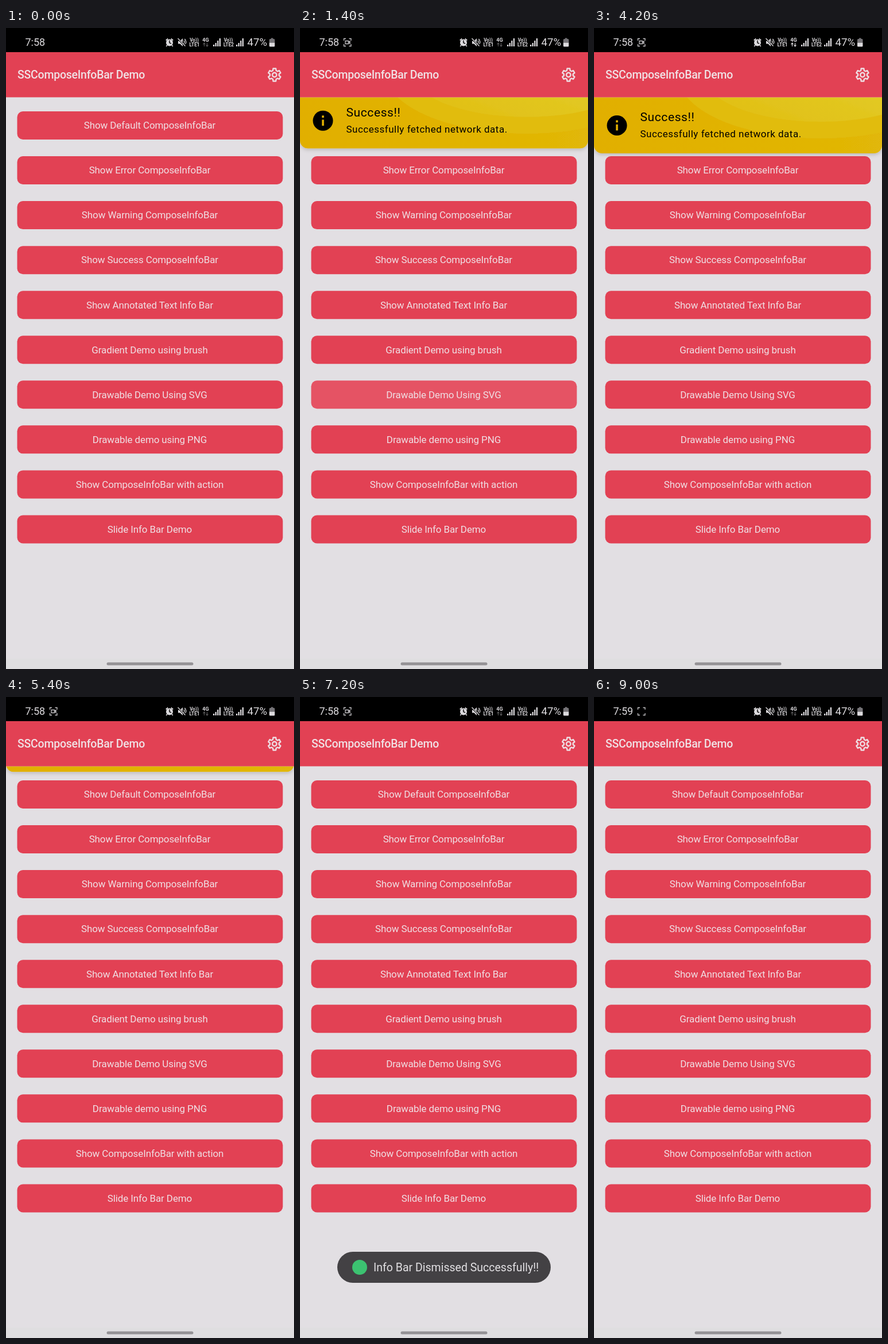
Animation, 502 px wide and 1115 px high, one loop 9.1 s. Source, as an HTML page:

```html
<!DOCTYPE html>
<html lang="en">
<head>
<meta charset="utf-8">
<title>SSComposeInfoBar Demo</title>
<style>
  html, body { margin: 0; width: 100%; height: 100%; overflow: hidden; background: #e2dfe3; }
  svg { display: block; width: 100vw; height: 100vh; font-family: Roboto, "Noto Sans", sans-serif; }
  .label { font-size: 17px; letter-spacing: -.12px; text-anchor: middle; fill: #efdfe4; }
  .tiny { font-size: 8.2px; font-weight: 700; text-anchor: middle; }
</style>
</head>
<body>
<svg viewBox="0 0 502 1115">
  <defs>
    <linearGradient id="gold" x2="1" y2="0">
      <stop stop-color="#e1af00"/><stop offset="1" stop-color="#e1b707"/>
    </linearGradient>
    <linearGradient id="lemon" x1="0" y1="1" x2=".6" y2=".4">
      <stop stop-color="#e1bd12"/><stop offset="1" stop-color="#e2cb26"/>
    </linearGradient>
    <filter id="shade" x="-5%" y="-10%" width="110%" height="130%">
      <feDropShadow dx="0" dy="2" stdDeviation="3.5" flood-color="#000" flood-opacity=".2"/>
    </filter>
    <clipPath id="below"><rect y="120.5" width="502" height="995"/></clipPath>
    <clipPath id="barShape"><path d="M0 100H502V204a14 14 0 0 1-14 14H14a14 14 0 0 1-14-14Z"/></clipPath>
    <clipPath id="pressed"><rect x="19.5" y="613" width="463" height="49" rx="10"/></clipPath>
  </defs>

  <rect width="502" height="1115" fill="#e2dfe3"/>
  <g id="buttons"></g>
  <circle id="ripple" cx="251" cy="637.5" fill="#fff" clip-path="url(#pressed)"/>

  <g clip-path="url(#below)">
    <g id="bar">
      <g filter="url(#shade)">
        <g clip-path="url(#barShape)">
          <rect y="100" width="502" height="118" fill="url(#gold)"/>
          <ellipse cx="395" cy="80" rx="250" ry="112" fill="#e1bc10"/>
          <ellipse cx="395" cy="80" rx="205" ry="83" fill="url(#lemon)"/>
        </g>
      </g>
      <circle cx="40" cy="169.5" r="17.5"/>
      <path d="M38.2 160.6h3.600v3.600h-3.600zM38.200 167.700h3.600v10.600h-3.600z" fill="#e1b002"/>
      <text x="80.5" y="162" font-size="21" letter-spacing=".6">Success!!</text>
      <text x="80.5" y="190" font-size="17" letter-spacing=".5">Successfully fetched network data.</text>
    </g>
  </g>

  <rect y="42" width="502" height="78.5" fill="#e24154"/>
  <text x="20" y="88" font-size="19.5" font-weight="500" letter-spacing="-.24" fill="#f0e1e5">SSComposeInfoBar Demo</text>
  <g transform="translate(468 81.5)" fill="none" stroke="#eedde2" stroke-width="2.4" stroke-linejoin="round">
    <path id="gear"/><circle r="3.7"/>
  </g>

  <rect width="502" height="42"/>
  <g fill="#dcdadd">
    <text id="clock" x="33.5" y="31" font-size="18"></text>
    <g id="record" fill="none" stroke="#c4c2c5" stroke-width="1.3">
      <path d="M76.5 22v-3.500h3.500M85.500 18.500h3.500v3.500M89 28v3.500h-3.500M80 31.500h-3.500v-3.500"/>
      <path id="camera" d="M79 22.500h5.500v5h-5.500zM84.500 24.500l2.500-1.500v4l-2.500-1.500"/>
    </g>
    <circle cx="285" cy="25.5" r="6"/>
    <path d="M278.800 21.500l3.500-3M291.200 21.500l-3.500-3M280.800 30l-1.500 2M289.200 30l1.500 2" stroke="#dcdadd" stroke-width="1.7"/>
    <path d="M285 21.500v4.200l3 1.500" fill="none" stroke="#000" stroke-width="1.4"/>
    <path d="M300 22.500h3.500l4.500-4.500v14l-4.500-4.500h-3.500z"/>
    <path d="M299.500 18.500l13 13" stroke="#000" stroke-width="3"/>
    <path d="M299.500 18l13 13.500M310 22q2 2.500 0 5M311.500 19q4 5.500 1 9" fill="none" stroke="#dcdadd" stroke-width="1.3"/>
    <g class="tiny">
      <text x="328" y="23.5">Vo))</text><text x="328.5" y="32">LTE1</text>
      <text x="387.5" y="23.5">Vo))</text><text x="388" y="32">LTE2</text>
      <text x="348" y="24" font-size="9">4G</text>
    </g>
    <path id="arrows" d="M345.500 32v-5.500m-2 2l2-2.500 2 2.500M350.500 26v5.500m-2-2l2 2.500 2-2.500" fill="none" stroke="#dcdadd" stroke-width="1.2"/>
    <g id="signals"></g>
    <text x="420.5" y="31" font-size="18.8">47%</text>
    <path d="M459 25.500v-5q0-1.500 1.500-1.500h1.500v-1.500h3.500v1.500h1.500q1.500 0 1.500 1.500v5z" fill="#757377"/>
    <path d="M459 25.500h9.500v5.500q0 1.500-1.500 1.500h-6.500q-1.500 0-1.500-1.500z"/>
  </g>

  <g id="toast">
    <rect x="65" y="965" width="372" height="54" rx="27" fill="#434144"/>
    <circle cx="104" cy="992" r="13" fill="#3cc271"/>
    <text x="128" y="999" font-size="19.5" fill="#e2e0e3">Info Bar Dismissed Successfully!!</text>
  </g>
  <rect y="1097" width="502" height="18" fill="#dfdee0"/>
  <rect x="175.5" y="1103.5" width="151" height="5" rx="2.5" fill="#949295"/>
</svg>

<script>
const LOOP = 9100, STEP = 100;
const BAR_IN = 1195, BAR_OUT = 5210, BAR_HEIGHT = 98;
const el = id => document.getElementById(id);
const ramp = (t, from, to) => Math.min(1, Math.max(0, (t - from) / (to - from)));

const labels = [
  "Show Default ComposeInfoBar", "Show Error ComposeInfoBar",
  "Show Warning ComposeInfoBar", "Show Success ComposeInfoBar",
  "Show Annotated Text Info Bar", "Gradient Demo using brush",
  "Drawable Demo Using SVG", "Drawable demo using PNG",
  "Show ComposeInfoBar with action", "Slide Info Bar Demo"
];
// The ripple sits between the button faces and their labels.
const faces = labels.map((_, i) =>
  `<rect x="19.5" y="${145 + 78.05 * i}" width="463" height="49" rx="10" fill="#e24154"/>`);
const captions = labels.map((text, i) =>
  `<text class="label" x="250.5" y="${175.3 + 78.05 * i}">${text}</text>`);
el("buttons").innerHTML = faces.join("");
el("ripple").insertAdjacentHTML("afterend", captions.join(""));

el("signals").innerHTML = [361, 401].map(x => [3, 6, 10, 14].map((h, i) =>
  `<rect x="${x + i * 3.6}" y="${32 - h}" width="2.3" height="${h}"/>`).join("")).join("");

function gearPath() {
  const points = [];
  for (let tooth = 0; tooth < 6; tooth++) {
    for (const [angle, r] of [[-21, 8], [-12, 11.2], [12, 11.2], [21, 8]]) {
      const a = (tooth * 60 + angle) * Math.PI / 180;
      points.push(`${(r * Math.sin(a)).toFixed(2)} ${(-r * Math.cos(a)).toFixed(2)}`);
    }
  }
  return `M${points.join("L")}Z`;
}
el("gear").setAttribute("d", gearPath());

// Critically damped spring: 1 at the start, settling to 0.
function spring(ms) {
  const x = Math.max(0, ms) * .02;
  return (1 + x) * Math.exp(-x);
}

function draw(t) {
  const hidden = t < BAR_OUT ? spring(t - BAR_IN) : 1 - spring(t - BAR_OUT);
  el("bar").setAttribute("transform", `translate(0 ${-BAR_HEIGHT * hidden})`);
  el("bar").style.display = hidden > .995 ? "none" : "";

  el("ripple").setAttribute("r", 60 + 190 * ramp(t, 1050, 1350));
  el("ripple").style.opacity = .095 * ramp(t, 1000, 1200) * (1 - ramp(t, 1400, 1700));

  el("toast").style.opacity = ramp(t, 5650, 5950) * (1 - ramp(t, 8000, 8400));

  el("clock").textContent = t < 8200 ? "7:58" : "7:59";
  el("record").style.display = t < 100 ? "none" : "";
  el("camera").style.display = (t + 900) % 1000 < 500 ? "" : "none";
  el("arrows").style.opacity = t >= 2500 && t < 4700 ? 1 : .4;
}

const start = performance.now();
function tick() {
  const t = (performance.now() - start) % LOOP;
  draw(Math.floor(t / STEP) * STEP);
  requestAnimationFrame(tick);
}
tick();
</script>
</body>
</html>
```
